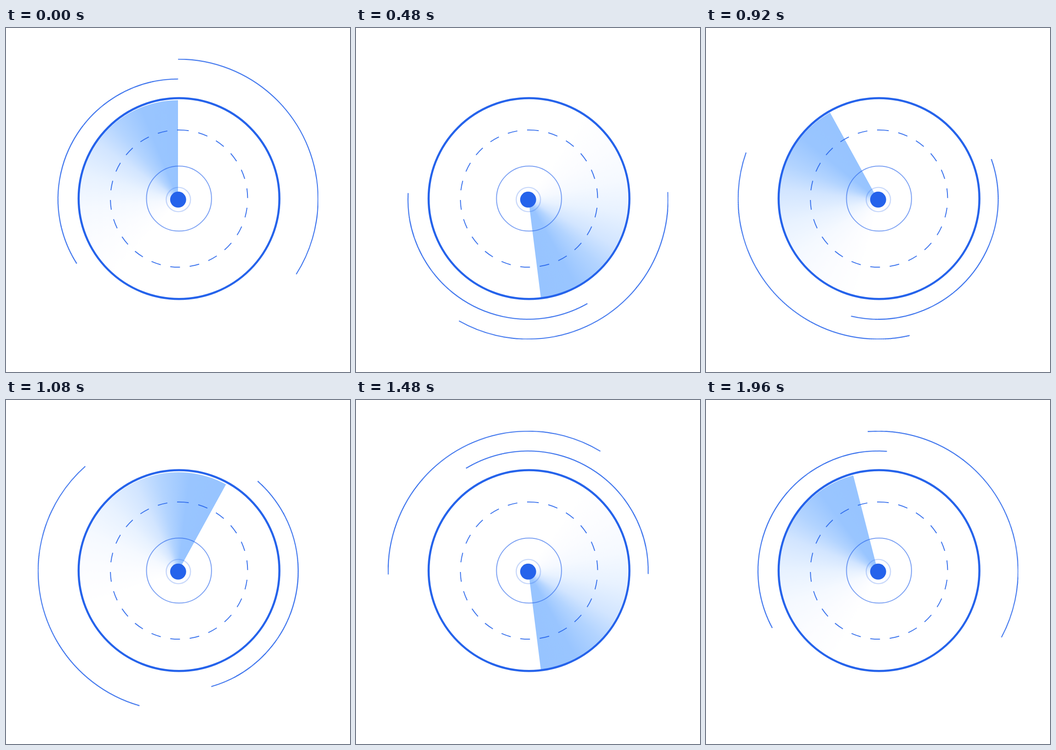
An HTML page that plays this animation: 748 px wide and 748 px high, repeating every 2 s.

```html
<!DOCTYPE html>
<html lang="en">
<head>
<meta charset="utf-8">
<title>Radar</title>
<style>
  html, body {
    margin: 0;
    width: 100%;
    height: 100%;
    overflow: hidden;
    background: #fff;
  }

  .stage {
    position: relative;
    width: 748px;
    height: 748px;
    overflow: hidden;
  }

  .sweep {
    position: absolute;
    left: 157.7px;
    top: 156.5px;
    width: 433px;
    height: 433px;
    border-radius: 50%;
    background: conic-gradient(
      #fff 0deg 220deg,
      #fbfcff 245deg,
      #f5f9ff 265deg,
      #e8f2ff 285deg,
      #d2e5ff 305deg,
      #b3d4ff 320deg,
      #99c5ff 338deg,
      #97c4ff 360deg
    );
    --turn: 720deg;
  }

  svg {
    position: absolute;
    inset: 0;
    fill: none;
    stroke: #2563eb;
    stroke-width: 2;
  }

  .arc {
    transform-origin: 374.2px 372.1px;
    --turn: 363.03deg;
  }

  .back { --turn: -363.03deg; }

  /* The arcs turn slightly faster than the loop and snap back at its end. */
  .spin { animation: spin 2s steps(50) infinite; }

  @keyframes spin {
    from { transform: rotate(0deg); }
    to { transform: rotate(var(--turn)); }
  }
</style>
</head>
<body>
<div class="stage">
  <div class="sweep spin"></div>
  <svg width="748" height="748" viewBox="0 0 748 748">
    <clipPath id="frame"><rect x="69" y="67" width="610" height="610"/></clipPath>

    <g clip-path="url(#frame)">
      <g class="arc spin">
        <circle cx="374.2" cy="372.1" r="304.4" pathLength="360"
          stroke-dasharray="122.45 237.55" transform="rotate(-90 374.2 372.1)"/>
      </g>
      <g class="arc back spin">
        <circle cx="374.2" cy="372.1" r="261.2" pathLength="360"
          stroke-dasharray="122.45 237.55" transform="rotate(147.55 374.2 372.1)"/>
      </g>
    </g>

    <circle cx="376.2" cy="370.9" r="218.3" stroke-width="4.5"/>
    <circle cx="376.2" cy="370.9" r="149.2" stroke-dasharray="21.2"
      stroke-opacity=".88" transform="rotate(-90 376.2 370.9)"/>
    <circle cx="376.2" cy="370.9" r="70.7" stroke-opacity=".6"/>
    <circle cx="374.8" cy="373" r="26.4" stroke-width="2.4" stroke-opacity=".25"/>
    <circle cx="374.3" cy="373.2" r="17.4" fill="#2563eb" stroke="none"/>
  </svg>
</div>
</body>
</html>
```
